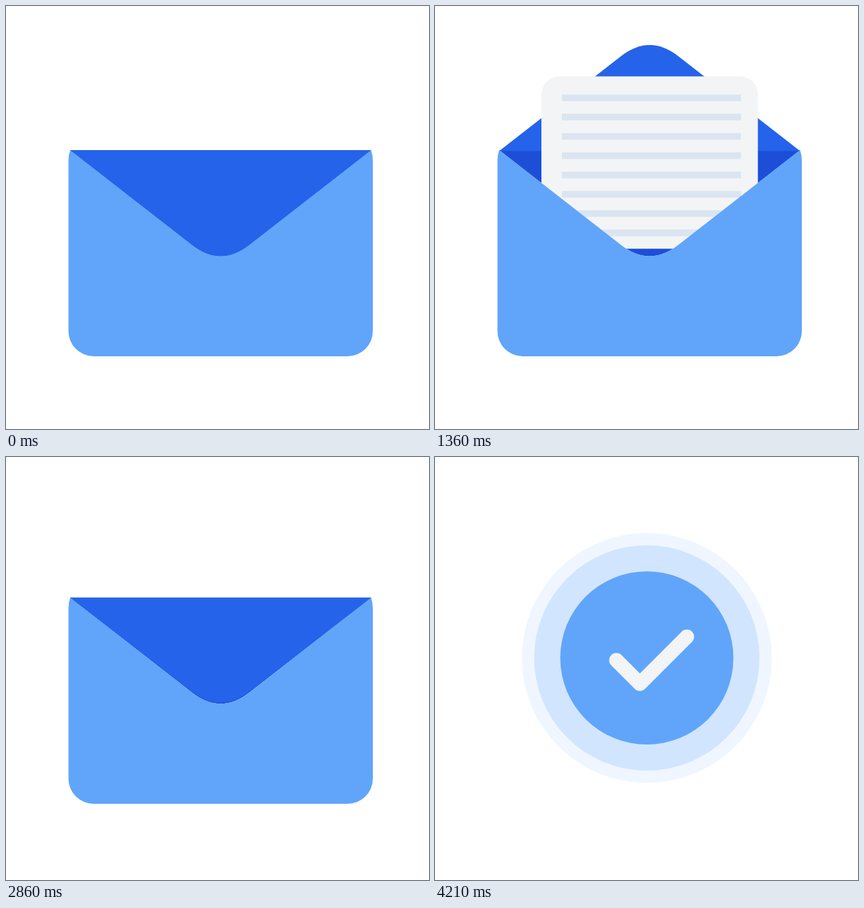
An HTML page with a canvas that plays this animation: 640x640 px, repeating every 4780 ms.

```html
<!DOCTYPE html>
<html lang="en">
<head>
<meta charset="utf-8">
<title>Mail sent</title>
<style>
html, body { margin: 0; width: 100%; height: 100%; overflow: hidden; background: #fff; }
canvas { display: block; width: 640px; height: 640px; }
</style>
</head>
<body>
<canvas id="stage"></canvas>
<script>
const SIZE = 640, LOOP = 4780, MID = 324.75;
const BLUE = '#60a5fa', FLAP = '#2563eb', INSIDE = '#1d4ed8';
const PAPER = '#f3f4f6', RULE = '#dbe5f1';

const canvas = document.getElementById('stage');
const ctx = canvas.getContext('2d');
const ratio = window.devicePixelRatio || 1;
canvas.width = canvas.height = SIZE * ratio;

const span = (t, a, b) => Math.min(1, Math.max(0, (t - a) / (b - a)));
const mix = (a, b, k) => a + (b - a) * k;
const inOut = k => (1 - Math.cos(Math.PI * k)) / 2;
const easeIn = k => 1 - Math.cos(Math.PI * k / 2);
const easeOut = k => 1 - (1 - k) ** 3;

// Keys are [time, value] pairs joined by a soft ease.
function track(t, keys) {
  let value = keys[0][1];
  for (let i = 1; i < keys.length; i++) {
    const [a, from] = keys[i - 1], [b, to] = keys[i];
    if (t >= a) value = mix(from, to, inOut(span(t, a, b)));
  }
  return value;
}

const lift = t => track(t, [[0, 0], [640, -50], [1180, 0], [1710, 0], [2420, -50], [2980, 0]]);
const flapTurn = t => track(t, [[290, 1], [860, -1], [2420, -1], [2880, 1]]);
const paperTop = t => track(t, [[640, -323], [1710, 242.5], [2420, 165], [2800, 392]]);

function fill(color, build) {
  ctx.beginPath();
  build();
  ctx.fillStyle = color;
  ctx.fill();
}

function pocketEdge() {
  ctx.lineTo(282, 362);
  ctx.quadraticCurveTo(MID, 395, 367.5, 362);
}

function pocket() {
  ctx.moveTo(97, 218);
  pocketEdge();
  ctx.lineTo(552.5, 218);
  ctx.closePath();
}

function front() {
  ctx.moveTo(97.2, 218);
  pocketEdge();
  ctx.lineTo(552.3, 218);
  ctx.quadraticCurveTo(555, 225, 555, 234);
  ctx.arcTo(555, 530, 517, 530, 38);
  ctx.arcTo(94.5, 530, 94.5, 492, 38);
  ctx.lineTo(94.5, 234);
  ctx.quadraticCurveTo(94.5, 225, 97.2, 218);
}

function drawFlap(turn) {
  ctx.save();
  ctx.translate(0, 218.8);
  ctx.scale(1, turn);
  ctx.translate(0, -218.8);
  fill(FLAP, pocket);
  ctx.restore();
}

function drawPaper(top) {
  ctx.save();
  ctx.beginPath();
  ctx.rect(150, 43, 350, 480);
  ctx.clip();
  fill(PAPER, () => ctx.roundRect(161, top, 327.5, 260.6, 27));
  ctx.fillStyle = RULE;
  for (let i = 0; i < 8; i++) ctx.fillRect(192, top + 27.3 + i * 29.2, 271, 10);
  ctx.restore();
}

function drawEnvelope(t) {
  const turn = flapTurn(t);
  fill(INSIDE, pocket);
  if (turn < 0) drawFlap(turn);
  if (t > 640 && t < 2800) drawPaper(paperTop(t));
  fill(BLUE, front);
  if (turn >= 0) drawFlap(turn);
}

function placeEnvelope(t) {
  const p = easeIn(span(t, 3150, 3430));
  const q = easeOut(span(t, 3430, 3640));
  const angle = mix(40 * p, 90, q) * Math.PI / 180;
  const size = mix(mix(1, 0.774, p), 0, q);
  ctx.translate(320, mix(320 - 45 * p ** 1.5, 304, q));
  ctx.rotate(-angle);
  ctx.scale(size, size);
  ctx.translate(-320, -320 + lift(t));
}

function disc(t, start, end, radius, color) {
  const r = radius * easeOut(span(t, start, end));
  if (r > 0) fill(color, () => ctx.arc(320.5, 304, r, 0, Math.PI * 2));
}

function drawCheck(t) {
  const k = inOut(span(t, 3920, 4200));
  if (k === 0) return;
  // The long arm is twice the short one.
  const a = Math.min(1, k * 3), b = Math.max(0, (k * 3 - 1) / 2);
  ctx.beginPath();
  ctx.moveTo(274.5, 307.5);
  ctx.lineTo(274.5 + 35.5 * a, 307.5 + 35.5 * a);
  if (b > 0) ctx.lineTo(310 + 71 * b, 343 - 71 * b);
  ctx.strokeStyle = PAPER;
  ctx.lineWidth = 22;
  ctx.lineCap = ctx.lineJoin = 'round';
  ctx.stroke();
}

function draw(t) {
  ctx.setTransform(ratio, 0, 0, ratio, 0, 0);
  ctx.fillStyle = '#fff';
  ctx.fillRect(0, 0, SIZE, SIZE);
  disc(t, 3500, 3705, 189, '#eff6ff');
  disc(t, 3600, 3930, 170.5, '#d1e5fe');
  disc(t, 3690, 4070, 131, BLUE);
  drawCheck(t);
  if (t < 3640) {
    ctx.save();
    placeEnvelope(t);
    drawEnvelope(t);
    ctx.restore();
  }
}

const begin = performance.now();
function tick() {
  draw((performance.now() - begin) % LOOP);
  requestAnimationFrame(tick);
}
tick();
</script>
</body>
</html>
```
